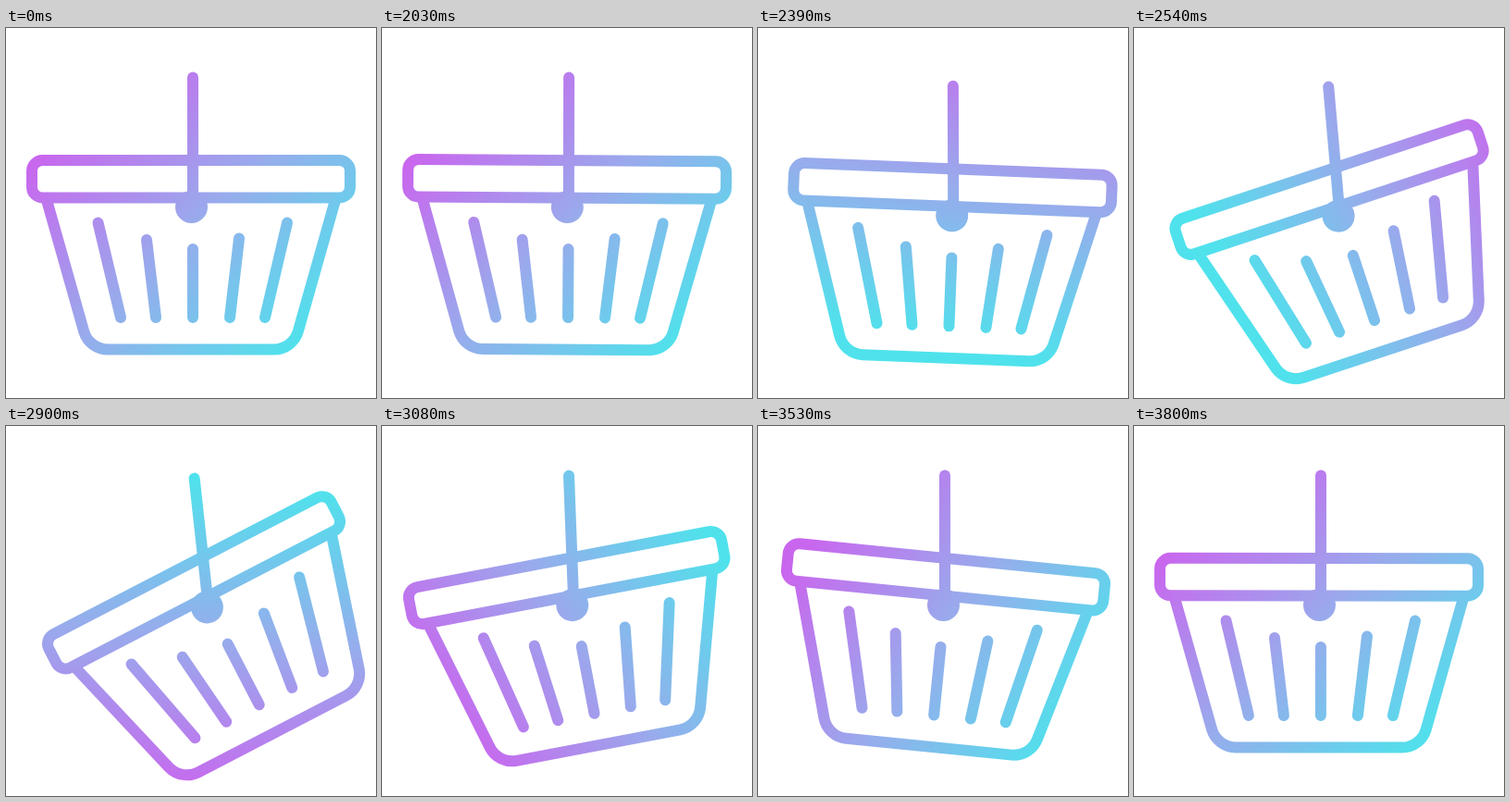
Recreate the animation shown at these times as an HTML page. Size 400 by 400 pixels, loop 3.83 s.

```html
<!DOCTYPE html>
<html lang="en">
<head>
<meta charset="utf-8">
<title>Swinging basket</title>
<style>
  html, body { margin: 0; width: 100%; height: 100%; overflow: hidden; background: #fff; }
  svg { display: block; width: 100%; height: 100%; }
</style>
</head>
<body>
<svg viewBox="0 0 400 400">
  <defs>
    <linearGradient id="tint" gradientUnits="userSpaceOnUse" x1="27" y1="200" x2="373" y2="200">
      <stop offset="0" stop-color="#c966ee"/>
      <stop offset=".5" stop-color="#98abec"/>
      <stop offset="1" stop-color="#4fe2ec"/>
    </linearGradient>
    <mask id="shape" maskUnits="userSpaceOnUse" x="0" y="0" width="400" height="400">
      <g id="handle" fill="none" stroke="#fff" stroke-width="12" stroke-linecap="round">
        <path d="M202 53.5V190"/>
        <circle cx="200.5" cy="193.5" r="17.5" fill="#fff" stroke="none"/>
        <g id="basket">
          <rect x="28" y="143" width="344" height="40.5" rx="11.5"/>
          <path d="M44 186L84.300 328.300A27 27 0 0 0 110 347.500H290A27 27 0 0 0 315.700 328.300L356 186"/>
          <path d="M99.500 210.500L124 313M152 229L162 313M202 239V313M252 227.500L242 313M304 210.500L280 313"/>
        </g>
      </g>
    </mask>
  </defs>
  <rect width="400" height="400" fill="url(#tint)" mask="url(#shape)"/>
</svg>
<script>
const LOOP = 3830, START = 2030, STEP = 30;
const byId = id => document.getElementById(id);
const handle = byId('handle'), basket = byId('basket'), tint = byId('tint');

// Tracks are [time, value] pairs, eased in and out between neighbours.
const tracks = {
  x: [[2000, 0], [2420, 9], [3080, 0]],
  y: [[2000, 0], [2480, 10.3], [3140, 0]],
  handle: [[1990, 0], [2260, 2], [2690, -7.8], [2760, -7.8], [3250, 0]],
  basket: [[1990, 0], [2292, 8], [2712, -33.5], [2750, -33.5], [3370, 8], [3820, 0]],
  shift: [[2110, 12], [2600, -60], [3260, 12]]
};

function sample(keys, t) {
  if (t <= keys[0][0]) return keys[0][1];
  for (let i = 1; i < keys.length; i++) {
    const [t0, a] = keys[i - 1], [t1, b] = keys[i];
    if (t < t1) {
      const p = (t - t0) / (t1 - t0);
      return a + (b - a) * p * p * (3 - 2 * p);
    }
  }
  return keys[keys.length - 1][1];
}

// Cubic bezier (x1, 0, x2, 1), solved by bisection.
function bezier(x1, x2, x) {
  let lo = 0, hi = 1;
  for (let i = 0; i < 24; i++) {
    const s = (lo + hi) / 2, r = 1 - s;
    if (3 * r * r * s * x1 + 3 * r * s * s * x2 + s ** 3 < x) lo = s; else hi = s;
  }
  return lo * lo * (3 - 2 * lo);
}

function draw(time) {
  const t = time < START ? 0 : START + Math.floor((time - START) / STEP) * STEP;
  const at = name => sample(tracks[name], t);
  const turn = bezier(.3, .45, Math.min(1, Math.max(0, (t - START) / 1770)));
  handle.setAttribute('transform', `translate(${at('x')} ${at('y')}) rotate(${at('handle')} 202 53.5)`);
  // The basket's own angle is absolute, so the handle's is taken back out.
  basket.setAttribute('transform', `rotate(${at('basket') - at('handle')} 200.5 193.5)`);
  tint.setAttribute('gradientTransform', `rotate(${45 + 360 * turn} 200 200) translate(${at('shift')} 0)`);
}

const begin = performance.now();
function tick() {
  draw((performance.now() - begin) % LOOP);
  requestAnimationFrame(tick);
}
draw(0);
requestAnimationFrame(tick);
</script>
</body>
</html>
```
